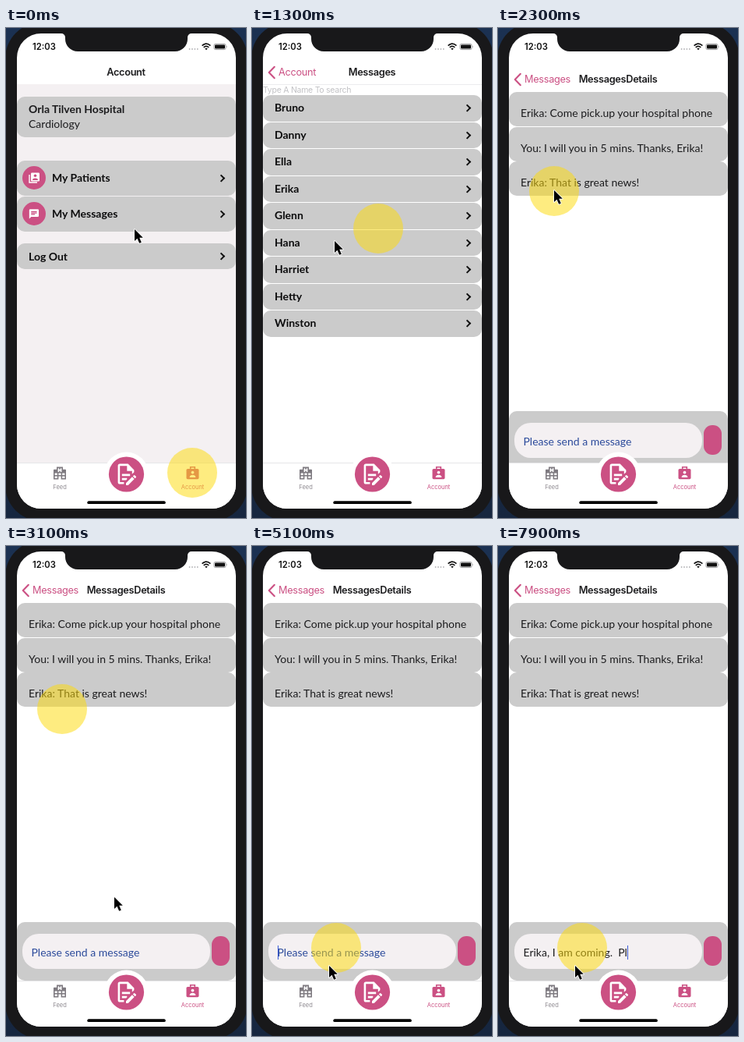
Write an HTML page that moves like this. It is 308 by 628 pixels and loops after 8 s.

```html
<!DOCTYPE html>
<html lang="en">
<head>
<meta charset="utf-8">
<title>Ward messages</title>
<style>
  :root { --pink: #cb5083; --grey: #cbcbcb; --pale: #f4f0f2; --push: cubic-bezier(.22, .75, .3, 1); }
  html, body { margin: 0; width: 100%; height: 100%; overflow: hidden; background: #14223f; }
  #stage { position: relative; width: 308px; height: 628px; overflow: hidden; font: 14px Lato, sans-serif; color: #1c1c1e;
    background: linear-gradient(#1b3152, #16263f); }
  #stage div, #stage svg { position: absolute; }
  .full { left: 0; top: 0; width: 308px; height: 628px; }
  .body { left: -1px; top: -7px; width: 311px; height: 639px; border-radius: 46px; background: #18181a; }
  .glass { background: #fff; clip-path: inset(7px 13px 12px 14px round 31px); }

  /* pages */
  .view { left: 14px; top: 72px; width: 281px; height: 485px; overflow: hidden; }
  .page { left: 0; top: 0; width: 281px; height: 485px; background: #fff; --gone: 1; --in: 281px; --out: -84px; }
  .row { left: 0; width: 281px; box-sizing: border-box; padding-left: 15px; border-radius: 10px; background: var(--grey); white-space: pre; }
  .link { font-weight: 700; color: #0c0c0d; }
  .link::after { content: ""; position: absolute; left: 259px; top: 50%; width: 4.5px; height: 4.5px; margin-top: -3.3px;
    border: solid #111; border-width: 2px 2px 0 0; transform: rotate(45deg); }
  .menu { height: 45px; line-height: 44px; padding-left: 45px; }
  .menu svg { left: 7px; top: 7px; }
  .name { top: calc(14px + var(--i) * 34.5px); height: 33.5px; line-height: 32px; }
  .chat { top: calc(1px + var(--i) * 44.7px); height: 44px; line-height: 53px; }
  .search { left: 0; top: 0; width: 281px; height: 13px; border-top: 1px solid #ececee; font: 10.5px/13px Inter, sans-serif;
    letter-spacing: -.025em; color: #c2c2c5; }
  .bar { left: 0; top: 410px; width: 281px; height: 75px; border-radius: 10px; background: var(--grey); }
  .field { left: 7px; top: 15px; width: 229px; height: 45px; padding-left: 11.5px; border-radius: 21px; background: var(--pale);
    line-height: 47px; white-space: pre; }
  .send { left: 250.4px; top: 18.4px; width: 22.6px; height: 38px; border-radius: 11px; background: var(--pink); }
  #hint { color: #2b4a9b; }
  .caret { display: inline-block; width: 1.5px; height: 18px; margin-right: -1.5px; vertical-align: -4px; background: #3d5bd8;
    animation: blink 8s linear infinite; }

  /* navigation bar */
  .nav { --gone: 0; font: 12.75px/20px Inter, sans-serif; letter-spacing: -.025em; white-space: nowrap; }
  .title { left: 54px; top: 47px; width: 200px; text-align: center; font-weight: 600; --in: 130px; --out: -96px; }
  .back { left: 34px; top: 47px; color: var(--pink); --in: 96px; --out: -60px; }
  .tab { top: 584px; width: 60px; text-align: center; font: 7.5px/10px Inter, sans-serif; }
  .time { left: 34px; top: 17px; font: 600 11.25px/14px Inter, sans-serif; color: #111; }

  .first { animation: first 8s var(--push) infinite; }
  .second { animation: second 8s var(--push) infinite; }
  .third { animation: third 8s var(--push) infinite; }
  .arrow { animation: arrow 8s var(--push) infinite; }
  .settle { animation: settle 8s step-end infinite; }
  .tap { left: -31.6px; top: -31.6px; width: 64px; height: 64px; border-radius: 50%; background: rgba(253, 219, 12, .52);
    animation: tap 8s step-end infinite; }
  .pointer { left: 0; top: 0; overflow: visible; animation: pointer 8s ease-in-out infinite; }

  @keyframes first {
    0%, 2.4% { transform: none; opacity: 1; }
    8.6%, 100% { transform: translateX(var(--out)); opacity: var(--gone); }
  }
  @keyframes second {
    0%, 2.4% { transform: translateX(var(--in)); opacity: var(--gone); }
    8.6%, 21.5% { transform: none; opacity: 1; }
    28%, 100% { transform: translateX(var(--out)); opacity: var(--gone); }
  }
  @keyframes third {
    0%, 21.5% { transform: translateX(var(--in)); opacity: var(--gone); }
    28%, 100% { transform: none; opacity: 1; }
  }
  @keyframes arrow { 0%, 2.4% { opacity: 0; } 8.6%, 100% { opacity: 1; } }
  @keyframes settle { 0% { transform: none; } 21.5% { transform: translateY(9px); } 29.8%, 100% { transform: none; } }
  @keyframes tap {
    0% { transform: translate(239px, 570px); }
    1.2% { transform: translate(162px, 257px); }
    20.6% { transform: translate(72px, 209px); }
    49.9%, 100% { transform: translate(108px, 515px); }
  }
  @keyframes pointer {
    0%, 13% { transform: translate(165px, 258px); }
    16.2%, 18.2% { transform: translate(106px, 273px); }
    20.6%, 29.6% { transform: translate(72px, 208px); }
    38.6%, 40.4% { transform: translate(139px, 450px); }
    47.5%, 50% { transform: translate(108px, 514px); }
    56%, 100% { transform: translate(99px, 538px); }
  }
  @keyframes blink {
    0%, 50.5% { opacity: 0; }
    51%, 53.8% { opacity: 1; }
    56.2%, 59.5% { opacity: 0; }
    63.2%, 66% { opacity: 1; }
    68.7%, 70.8% { opacity: 0; }
    71.2%, 100% { opacity: 1; }
  }
</style>
</head>
<body>
<div id="stage">
  <div class="body"></div>
  <div class="full glass">
    <div class="view">
      <div class="page first" style="background:var(--pale)">
        <div class="row" style="top:16px;height:52px;padding-top:6px;line-height:19px"><b>Orla Tilven Hospital</b><br>Cardiology</div>
        <div class="row link menu" style="top:98px">My Patients
          <svg width="30" height="30"><circle cx="15" cy="15" r="15" fill="#cb5083"/>
            <path d="M9 11V21H19" fill="none" stroke="#fff" stroke-width="1.4"/>
            <rect x="11" y="8.5" width="11" height="11" rx="1.2" fill="#fff"/>
            <circle cx="16.5" cy="12.3" r="1.8" fill="#cb5083"/><path d="M13 18C13 14.8 20 14.8 20 18Z" fill="#cb5083"/></svg></div>
        <div class="row link menu" style="top:144px">My Messages
          <svg width="30" height="30"><circle cx="15" cy="15" r="15" fill="#cb5083"/>
            <path transform="translate(7.6 8) scale(.61)" fill="#fff" fill-rule="evenodd"
              d="M20 2H4A2 2 0 0 0 2 4V22L6 18H20A2 2 0 0 0 22 16V4A2 2 0 0 0 20 2ZM6 9H18V11H6ZM6 12H14V14H6ZM6 6H18V8H6Z"/></svg></div>
        <div class="row link" style="top:204px;height:33px;line-height:33px">Log Out</div>
      </div>
      <div class="page second">
        <div class="search">Type A Name To search</div>
        <div class="row link name" style="--i:0">Bruno</div>
        <div class="row link name" style="--i:1">Danny</div>
        <div class="row link name" style="--i:2">Ella</div>
        <div class="row link name" style="--i:3">Erika</div>
        <div class="row link name" style="--i:4">Glenn</div>
        <div class="row link name" style="--i:5">Hana</div>
        <div class="row link name" style="--i:6">Harriet</div>
        <div class="row link name" style="--i:7">Hetty</div>
        <div class="row link name" style="--i:8">Winston</div>
      </div>
      <div class="page third">
        <div class="page settle">
          <div class="row chat" style="--i:0">Erika: Come pick.up your hospital phone</div>
          <div class="row chat" style="--i:1">You: I will you in 5 mins. Thanks, Erika!</div>
          <div class="row chat" style="--i:2">Erika: That is great news!</div>
          <div class="bar">
            <div class="field"><span id="typed"></span><i class="caret"></i><span id="hint">Please send a message</span></div>
            <div class="send"></div>
          </div>
        </div>
      </div>
    </div>

    <div class="full nav settle">
      <svg class="arrow" width="308" height="90"><path d="M28.8 49.8L21.8 57L28.8 64.2" fill="none" stroke="#cb5083" stroke-width="2.1" stroke-linecap="round" stroke-linejoin="round"/></svg>
      <div class="title first">Account</div>
      <div class="title second">Messages</div>
      <div class="title third">MessagesDetails</div>
      <div class="back second">Account</div>
      <div class="back third">Messages</div>
    </div>

    <svg class="full" viewBox="0 0 308 628">
      <path d="M14 557H295V617H14Z" fill="#fff"/>
      <path d="M14 557.5H295" stroke="#e6e6e8"/>
      <circle cx="154.5" cy="572" r="28.5" fill="#fff"/>
      <circle cx="154.5" cy="572" r="22.6" fill="#cb5083"/>
      <path transform="translate(138.4 556) scale(1.3)" fill="#fff" d="M8 12H16V14H8ZM10 20H6V4H13V9H18V12.1L20 10.1V8L14 2H6A2 2 0 0 0 4 4V20A2 2 0 0 0 6 22H10ZM8 18H12.1L13 17.1V16H8ZM20.2 13Q20.4 13 20.6 13.2L21.9 14.5Q22.2 14.9 21.9 15.3L20.9 16.3L18.8 14.2L19.8 13.2Q20 13 20.2 13ZM20.2 16.9L14.1 23H12V20.9L18.1 14.8Z"/>
      <path transform="translate(59.4 561) scale(.8)" fill="#7e7a80" fill-rule="evenodd" d="M2 22V7A1 1 0 0 1 3 6H7V2H17V6H21A1 1 0 0 1 22 7V22H14V17H10V22ZM9 4V10H11V8H13V10H15V4H13V6H11V4ZM4 20H8V17H4ZM4 15H8V12H4ZM16 20H20V17H16ZM16 15H20V12H16ZM10 15H14V12H10Z"/>
      <rect x="231.5" y="565" width="16" height="13.2" rx="1.6" fill="#cb5083"/>
      <path d="M236.7 566V562.8H242.3V566" fill="none" stroke="#cb5083" stroke-width="1.6"/>
      <circle cx="239.5" cy="569.6" r="1.9" fill="#fff"/>
      <path d="M235.6 576C235.6 571.6 243.4 571.6 243.4 576Z" fill="#fff"/>
      <rect x="104.3" y="606.3" width="100.5" height="3.7" rx="1.85"/>

      <g fill="#b4b4b7"><circle cx="235.6" cy="27" r=".9"/><circle cx="239" cy="27" r=".9"/><circle cx="242.4" cy="27" r=".9"/><circle cx="245.8" cy="27" r=".9"/></g>
      <g fill="none" stroke="#111" stroke-width="1.7"><path d="M251.6 22.6Q257 17.8 262.4 22.6"/><path d="M253.7 24.9Q257 22 260.3 24.9"/></g>
      <path d="M255.2 26.3Q257 25 258.8 26.3L257 28.2Z" fill="#111"/>
      <rect x="266.9" y="20.4" width="15.2" height="7.2" rx="2" fill="none" stroke="#8b8b8d" stroke-width=".8"/>
      <rect x="268" y="21.5" width="13" height="5" rx="1.1" fill="#111"/>
      <path d="M283 22.8Q284.4 24 283 25.2Z" fill="#8b8b8d"/>
    </svg>
    <div class="time">12:03</div>
    <div class="tab" style="left:39px;color:#8e8a90">Feed</div>
    <div class="tab" style="left:209.5px;color:var(--pink)">Account</div>
  </div>

  <svg class="full" viewBox="0 0 308 628">
    <path d="M71 6V7A5 5 0 0 1 76 12V14A16 16 0 0 0 92 30H217A16 16 0 0 0 233 14V12A5 5 0 0 1 238 7V6Z" fill="#18181a"/>
  </svg>
  <div class="tap"></div>
  <svg class="pointer" width="12" height="19">
    <path transform="scale(1.06)" d="M0 0V14.2L3.3 11.1L5.8 16.8L8.3 15.7L5.9 10.2H10.2Z" stroke="#fff" stroke-width="1.6" paint-order="stroke" stroke-linejoin="round"/>
  </svg>
</div>

<script>
  // Bursts of typing: text, time of its first key, time between keys
  const bursts = [
    ["Erika, I am", 5690, 79],
    [" ", 6690, 100],
    ["coming.  P", 6990, 88],
    ["l", 7890, 100]
  ];
  const typed = document.getElementById("typed");
  const hint = document.getElementById("hint");
  let start;

  function textAt(ms) {
    return bursts.map(([text, from, gap]) =>
      text.slice(0, Math.max(0, Math.floor((ms - from) / gap) + 1))).join("");
  }

  function draw(now) {
    start ??= now;
    const text = textAt((now - start) % 8000);
    if (typed.textContent !== text) typed.textContent = text;
    hint.style.visibility = text ? "hidden" : "visible";
    requestAnimationFrame(draw);
  }
  requestAnimationFrame(draw);
</script>
</body>
</html>
```
